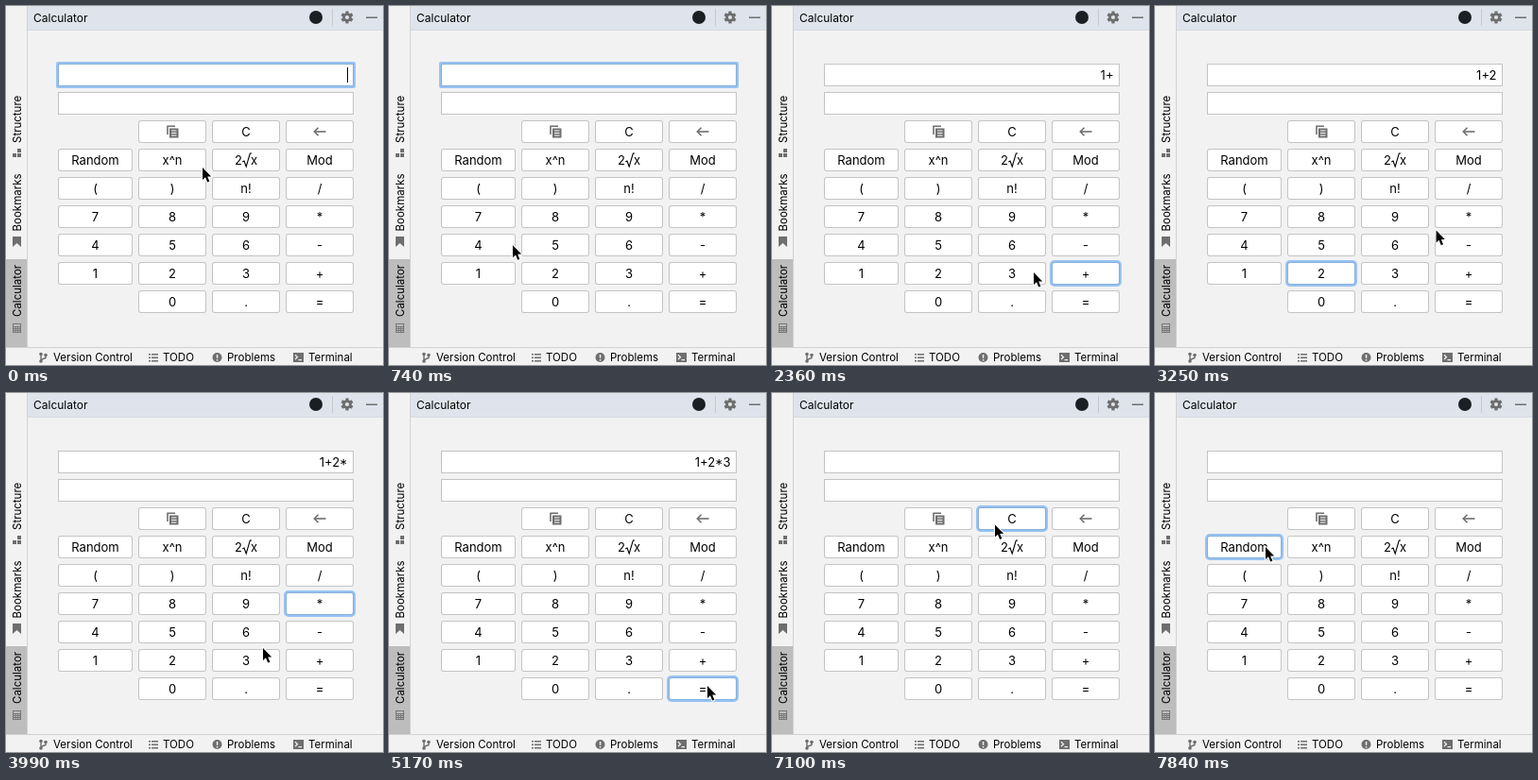
An HTML page with a canvas that plays this animation: 399 by 380 pixels, repeating every 7.99 s.

```html
<!DOCTYPE html>
<html lang="en">
<head>
<meta charset="utf-8">
<title>Calculator</title>
<style>
html, body { margin: 0; width: 100%; height: 100%; overflow: hidden; background: #f2f2f2; }
canvas { display: block; width: 399px; height: 380px; }
</style>
</head>
<body>
<canvas id="stage" width="399" height="380"></canvas>
<script>
const canvas = document.getElementById('stage');
const ctx = canvas.getContext('2d');
const LOOP = 7990, TICK = 148;
const GRAY = '#6e6e6e', INK = '#000';
const COLS = [[55, 79], [140, 72], [218, 72], [296, 72]];
const KEYS = [
  ['', 'copy', 'C', 'back'],
  ['Random', 'x^n', 'root', 'Mod'],
  ['(', ')', 'n!', '/'],
  ['7', '8', '9', '*'],
  ['4', '5', '6', '-'],
  ['1', '2', '3', '+'],
  ['', '0', '.', '=']
];

// Pointer stops: tick, x, y
const PATH = [
  [1, 208, 171], [7, 104, 282], [10, 104, 282], [13, 335, 282],
  [15, 335, 282], [16, 277, 282], [18, 185, 282], [20, 185, 282],
  [23, 337, 222], [25, 331, 226], [27, 272, 270], [28, 262, 282],
  [30, 262, 282], [32, 337, 310], [37, 337, 310], [40, 252, 152],
  [41, 252, 152], [42, 258, 135], [47, 258, 135], [51, 117, 163]
];
const FOCUS = [[0, 'field'], [9, '1'], [14, '+'], [19, '2'], [23, '*'], [29, '3'], [35, '='], [46, 'C'], [53, 'Random']];
const INPUT = [[0, ''], [10, '1'], [15, '1+'], [20, '1+2'], [24, '1+2*'], [30, '1+2*3'], [47, '']];
const RESULT = [[0, ''], [36, '7.0'], [47, '']];
const CARET = [[0, 1], [3, 0], [6, 1], [9, 0]];

function at(list, n) {
  let value;
  for (const [start, v] of list) if (n >= start) value = v;
  return value;
}

function pointer(n) {
  let a = PATH[0];
  for (const b of PATH) {
    if (n < b[0]) {
      const u = Math.max(0, (n - a[0]) / (b[0] - a[0]));
      const e = u * u * (3 - 2 * u);
      return [a[1] + (b[1] - a[1]) * e, a[2] + (b[2] - a[2]) * e];
    }
    a = b;
  }
  return [a[1], a[2]];
}

function rect(x, y, w, h, color) {
  ctx.fillStyle = color;
  ctx.fillRect(x, y, w, h);
}

function round(x, y, w, h, r, color) {
  ctx.fillStyle = color;
  ctx.beginPath();
  ctx.roundRect(x, y, w, h, r);
  ctx.fill();
}

function disc(x, y, r, color) {
  ctx.fillStyle = color;
  ctx.beginPath();
  ctx.arc(x, y, r, 0, 7);
  ctx.fill();
}

function trace(points) {
  ctx.beginPath();
  for (let i = 0; i < points.length; i += 2) ctx.lineTo(points[i], points[i + 1]);
}

function line(points, color, width) {
  trace(points);
  ctx.strokeStyle = color;
  ctx.lineWidth = width;
  ctx.stroke();
}

function text(s, x, y, size, align = 'left', color = INK) {
  ctx.font = `${size}px Inter, sans-serif`;
  ctx.textAlign = align;
  ctx.fillStyle = color;
  ctx.fillText(s, x, y);
}

function sideText(s, y) {
  ctx.save();
  ctx.translate(15.5, y);
  ctx.rotate(-Math.PI / 2);
  text(s, 0, 0, 11.5);
  ctx.restore();
}

function box(x, y, w, h, r, focused) {
  if (focused) round(x - 2, y - 2, w + 4, h + 4, r + 2, '#97c3f3');
  round(x, y, w, h, r, focused ? '#87afda' : '#c4c4c4');
  round(x + 1, y + 1, w - 2, h - 2, Math.max(0, r - 1), '#fff');
}

function copyIcon() {
  line([171, 136, 171, 127.2, 179, 127.2], GRAY, 1.6);
  rect(173, 129.5, 9.5, 10, GRAY);
  for (const y of [131.5, 134, 136.5]) rect(175, y, 5.5, 1, '#fff');
}

function backIcon() {
  line([338.5, 133, 326.5, 133], GRAY, 1.6);
  line([330.5, 128.8, 326.3, 133, 330.5, 137.2], GRAY, 1.6);
}

function label(s, x, y) {
  if (s === 'copy') copyIcon();
  else if (s === 'back') backIcon();
  else if (s === 'root') {
    text('2', 242, y + 5, 13);
    text('x', 259, y + 5, 13);
    line([250.3, y + 2, 252, y + 1, 254.2, y + 7, 258.3, y - 7, 260, y - 7], INK, 1.1);
  } else text(s, x, y + 5, 13, 'center');
}

function gear(x, y) {
  ctx.save();
  ctx.translate(x, y);
  for (let i = 0; i < 6; i++) {
    rect(-1.6, -6.5, 3.2, 4, GRAY);
    ctx.rotate(Math.PI / 3);
  }
  disc(0, 0, 4.8, GRAY);
  disc(0, 0, 2.1, '#dfe4ec');
  ctx.restore();
}

function sidebar() {
  rect(0, 268, 22, 93, '#bdbdbd');
  rect(22, 0, 1, 361, '#d1d1d1');
  sideText('Structure', 145);
  sideText('Bookmarks', 238.5);
  sideText('Calculator', 329);
  for (const [x, y] of [[12, 151], [7, 156], [12, 156]]) rect(x, y, 4, 4, GRAY);
  trace([7, 244, 16, 244, 16, 255, 11.5, 251, 7, 255]);
  ctx.fillStyle = GRAY;
  ctx.fill();
  rect(7, 336, 9, 10, '#777');
  rect(8, 337, 7, 2, '#bdbdbd');
  for (let i = 0; i < 9; i++) rect(8 + i % 3 * 2.5, 340 + (i / 3 | 0) * 2, 1.6, 1, '#bdbdbd');
}

function header() {
  rect(23, 0, 376, 25, '#dfe4ec');
  rect(23, 25, 376, 1, '#d5d8de');
  text('Calculator', 29, 17, 12);
  disc(328, 12, 7, '#1b1f23');
  rect(345, 3, 1, 18, '#c5cad2');
  gear(361, 12);
  rect(381, 11.5, 12, 1.5, GRAY);
}

function footer() {
  rect(0, 361, 399, 1, '#d1d1d1');
  text('Version Control', 50, 376, 11.5);
  text('TODO', 166, 376, 11.5);
  text('Problems', 234, 376, 11.5);
  text('Terminal', 320, 376, 11.5);
  line([37, 368, 37, 377], GRAY, 1.4);
  line([42, 370, 42, 372.5, 37, 374.5], GRAY, 1.4);
  for (const [x, y] of [[37, 368.5], [42, 369.5], [37, 376]]) disc(x, y, 1.8, GRAY);
  for (const y of [368, 371.5, 375]) {
    rect(151, y, 2, 1.5, GRAY);
    rect(154, y, 7, 1.5, GRAY);
  }
  disc(223.5, 372, 5, GRAY);
  rect(222.8, 369, 1.5, 3.8, '#f2f2f2');
  rect(222.8, 374, 1.5, 1.5, '#f2f2f2');
  rect(304, 367, 11, 10, GRAY);
  line([306, 369.3, 308.5, 371.7, 306, 374], '#f2f2f2', 1.2);
  rect(309.5, 374, 3.5, 1.2, '#f2f2f2');
}

function arrow(x, y) {
  ctx.save();
  ctx.translate(x, y);
  trace([0, 0, 0, 13, 3, 10.3, 5.2, 15.6, 7.4, 14.7, 5.2, 9.6, 9.2, 9.4]);
  ctx.closePath();
  ctx.lineJoin = 'round';
  ctx.strokeStyle = '#fff';
  ctx.lineWidth = 2;
  ctx.stroke();
  ctx.fillStyle = INK;
  ctx.fill();
  ctx.restore();
}

function draw(t) {
  const n = Math.floor((t + 10) / TICK);
  const focus = at(FOCUS, n);
  rect(0, 0, 399, 380, '#f2f2f2');
  sidebar();
  header();
  footer();
  box(55, 61, 313, 24, 0, focus === 'field');
  box(55, 91, 313, 24, 0, false);
  text(at(INPUT, n), 361.5, 78, 13, 'right');
  text(at(RESULT, n), 361.5, 108, 13, 'right');
  if (at(CARET, n)) rect(361, 65, 1, 16, INK);
  KEYS.forEach((row, r) => row.forEach((key, c) => {
    if (!key) return;
    const [x, w] = COLS[c], y = 121 + r * 30;
    box(x, y, w, 24, 3, focus === key);
    label(key, x + w / 2, y + 12);
  }));
  arrow(...pointer(n));
}

function frame(now) {
  draw(now % LOOP);
  requestAnimationFrame(frame);
}
draw(0);
requestAnimationFrame(frame);
</script>
</body>
</html>
```
